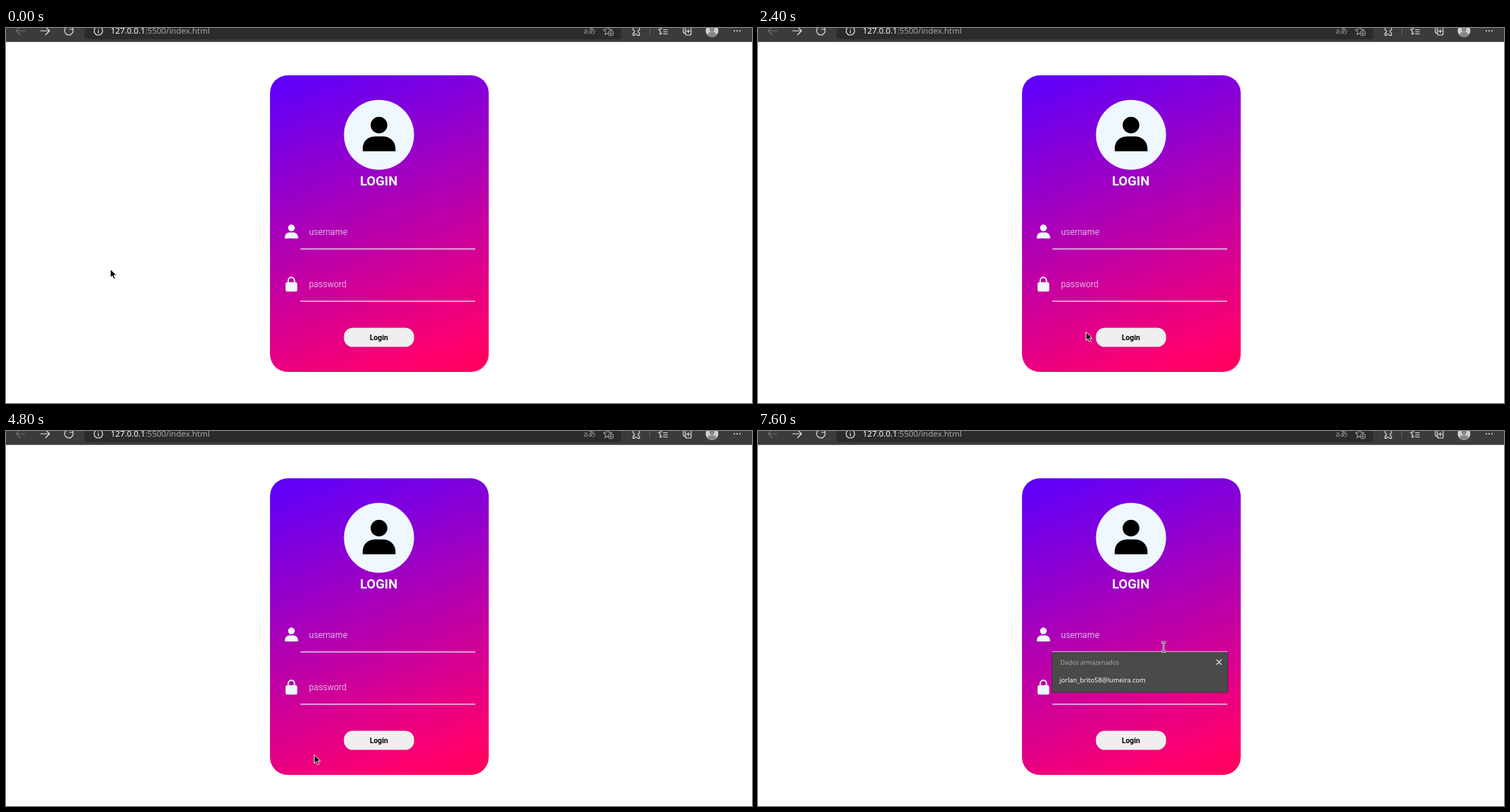
An HTML page that plays this animation: 1054x531 px, repeating every 8000 ms.

```html
<!DOCTYPE html>
<html lang="en">
<head>
<meta charset="utf-8">
<title>Login</title>
<style>
html, body { margin: 0; width: 100%; height: 100%; overflow: hidden; background: #fff; }
body { position: relative; }
svg { position: absolute; left: 0; top: 0; }
.card {
  position: absolute; left: 372.5px; top: 66.5px; width: 309px; height: 420px; border-radius: 25px;
  background: linear-gradient(160deg, #5a00ff, #ff006e 90%, #ff0059);
}
text { font-family: Roboto, sans-serif; }
.title { font-size: 18.4px; font-weight: 700; fill: #f0f8ff; text-anchor: middle; }
.hint { font-size: 12.35px; font-weight: 300; fill: #f0f8ff; }
.go { font-size: 10.3px; font-weight: 700; text-anchor: middle; }
.url { font: 11.5px "Noto Sans", sans-serif; fill: #a6a6a6; }
.pop text { font-family: "Noto Sans", sans-serif; }
.line { fill: none; stroke: #e4e4e4; stroke-width: 1.2; stroke-linecap: round; stroke-linejoin: round; }

.button, .cursor, .arrow, .beam, .pop, .caret { animation: 8s step-end infinite; }
.button { animation-name: dodge; }
.cursor { animation-name: travel; }
.arrow { animation-name: arrow; }
.beam { animation-name: beam; }
.pop { animation-name: pop; }
.caret { animation-name: caret; }

/* 1.25% is one tick of 100 ms */
@keyframes dodge {
  0%, 41.25%, 57.5%, 73.75% { transform: none; }
  37.5% { transform: translateX(50px); }
  40% { transform: translateX(7.5px); }
  47.5% { transform: translateX(-4px); }
  50% { transform: translateX(-93px); }
  51.25% { transform: translateX(-99px); }
  55% { transform: translateX(-30px); }
  60% { transform: none; }
  62.5% { transform: translateX(22px); }
  65% { transform: translateX(95px); }
  66.25% { transform: translateX(99px); }
  71.25% { transform: translateX(60px); }
}
@keyframes travel {
  0% { transform: translate(147px, 341px); }
  3.75% { transform: translate(147px, 341px); animation-timing-function: steps(2, start); }
  6.25% { transform: translate(190px, 335px); animation-timing-function: steps(3, start); }
  10% { transform: translate(430px, 292px); animation-timing-function: steps(2, start); }
  12.5% { transform: translate(456px, 290px); }
  15% { transform: translate(456px, 290px); animation-timing-function: steps(3, start); }
  18.75% { transform: translate(441px, 321px); animation-timing-function: steps(5, start); }
  25% { transform: translate(440px, 368px); }
  28.75% { transform: translate(450px, 400px); }
  30% { transform: translate(463px, 430px); }
  37.5% { transform: translate(632px, 518px); }
  40% { transform: translate(661px, 529px); }
  41.25% { transform: translate(661px, 540px); }
  43.75% { transform: translate(661px, 480px); }
  45% { transform: translate(640px, 452px); }
  47.5% { transform: translate(560px, 437px); }
  50% { transform: translate(636px, 444px); }
  51.25% { transform: translate(627px, 436px); }
  55% { transform: translate(470px, 518px); }
  57.5% { transform: translate(428px, 493px); }
  60% { transform: translate(435px, 458px); }
  62.5% { transform: translate(486px, 437px); }
  65% { transform: translate(445px, 441px); }
  66.25% { transform: translate(432px, 437px); }
  68.75% { transform: translate(487px, 512px); }
  71.25% { transform: translate(821px, 397px); }
  73.75% { transform: translate(829px, 396px); }
  76.25% { transform: translate(788px, 387px); }
  78.75% { transform: translate(640px, 325px); }
  80% { transform: translate(575px, 307px); }
  93.75% { transform: translate(574px, 306px); }
  95%, 100% { transform: translate(573px, 306px); }
}
@keyframes arrow {
  0%, 17.5%, 28.75% { opacity: 1; }
  8.75%, 20%, 80%, 100% { opacity: 0; }
}
@keyframes beam {
  0%, 17.5%, 28.75% { opacity: 0; }
  8.75%, 20%, 80%, 100% { opacity: 1; }
}
@keyframes pop {
  0% { opacity: 0; }
  88.75%, 100% { opacity: 1; }
}
@keyframes caret {
  0%, 95%, 100% { opacity: 0; }
  88.75% { opacity: 1; }
}
</style>
</head>
<body>
<div class="card"></div>
<svg width="1054" height="531" viewBox="0 0 1054 531">
  <defs>
    <path id="bust" d="M504 174.5V171C504 160 512 153.5 521 153.5H533C542 153.5 550.3 160 550.3 171V174.5Z M515.2 137.5a11.8 11.8 0 1 1 23.6 0a11.8 11.8 0 1 1-23.6 0"/>
    <path id="star" d="M0-6L1.8-2.1 6-1.6 2.9 1.3 3.7 5.5 0 3.4-3.7 5.5-2.9 1.3-6-1.6-1.8-2.1Z"/>
  </defs>

  <g class="toolbar">
    <rect width="1054" height="19.7" fill="#3b3b3b"/>
    <rect x="111" y="-10" width="758" height="26" rx="4" fill="#2b2b2b"/>
    <path class="line" style="stroke:#707070" d="M27 4H15M20-1.5L14.500 4L20 9.500"/>
    <path class="line" d="M49 4H61M56-1.500L61.500 4L56 9.500"/>
    <path class="line" d="M94.500 2A6 6 0 1 1 91-1.700M94.500-3V2H90"/>
    <circle class="line" cx="130.500" cy="4" r="6"/>
    <path class="line" d="M130.500 3.500V7M130.500 1V1.200"/>
    <text class="url" x="148" y="8"><tspan fill="#fff">127.0.0.1</tspan>:5500/index.html</text>
    <text x="816" y="7.500" style="font:11px 'Noto Sans CJK JP','Noto Sans CJK',sans-serif" fill="#999" textLength="0">aあ</text>
    <g class="line" style="stroke:#999">
      <use href="#star" x="850" y="4"/>
      <circle cx="854.500" cy="7.500" r="3.500" fill="#2b2b2b"/>
      <path d="M852.800 7.500h3.400M854.500 5.800v3.400"/>
    </g>
    <path class="line" d="M886-1H889A2 2 0 0 1 893-1H895V3A2 2 0 0 0 895 7V10.500H892A2 2 0 0 0 888 10.500H886V7A2 2 0 0 0 886 3Z"/>
    <path d="M909.500 0V10" stroke="#666"/>
    <path class="line" d="M929-.500L927-3L925.500 1.500L922 2L924.700 4.700L924 9L927 7.500M929 2.500H934.500M929 5.500H934.500M929 8.500H934.500"/>
    <path class="line" d="M957-2V5Q957 7.500 959.500 7.500M960-1H966Q968 -1 968 1V8Q968 10 966 10H962Q960 10 960 8ZM964 2V7M961.500 4.500H966.500"/>
    <circle cx="997.500" cy="4" r="9" fill="#d2d0ce"/>
    <circle cx="997.500" cy="2" r="3.500" fill="#8a8886"/>
    <path d="M991 10A6.500 4.500 0 0 1 1004 10A9 9 0 0 1 991 10" fill="#8a8886"/>
    <path d="M1029 4h.1M1033 4h.1M1037 4h.1" stroke="#e4e4e4" stroke-width="2" stroke-linecap="round"/>
  </g>

  <circle cx="527" cy="151.200" r="49.500" fill="#f0f8ff"/>
  <use href="#bust"/>
  <text class="title" x="526.700" y="223">LOGIN</text>

  <g fill="#f0f8ff">
    <use href="#bust" transform="translate(403.300 298) scale(.405) translate(-527.100 -174.500)"/>
    <rect x="395" y="360" width="16.500" height="13.300" rx="2.500"/>
    <path d="M398.800 361V357.500a4.400 4.400 0 0 1 8.800 0V361" fill="none" stroke="#f0f8ff" stroke-width="2"/>
    <path d="M416 312.300h247v1.300h-247zM416 386.300h247v1.300h-247z"/>
  </g>
  <text class="hint" x="428" y="292.500">username</text>
  <text class="hint" x="428" y="367">password</text>

  <g class="button">
    <rect x="477.500" y="424.500" width="99" height="27" rx="12.300" fill="#efefef"/>
    <text class="go" x="526.800" y="441.700">Login</text>
  </g>

  <path class="caret" d="M428.500 281V296" stroke="#fff"/>
  <g class="pop">
    <rect x="415.500" y="313.500" width="248" height="56.500" rx="2" fill="#4a4a4a" stroke="#363636"/>
    <text x="427.300" y="330.500" font-size="8.600" fill="#a8a8a8">Dados armazenados</text>
    <text x="426" y="356.300" font-size="9.150" fill="#fff">jorlan_brito58@lumeira.com</text>
    <path class="line" d="M648 324l6.500 6.500M654.500 324l-6.500 6.500"/>
  </g>

  <g class="cursor">
    <path class="arrow" d="M.500.500V12.500L3.200 10L5.300 14.500L7.400 13.500L5.300 9.200H9Z" stroke="#fff" stroke-width=".9"/>
    <g class="beam" fill="none">
      <path d="M-3-6.500H3M0-6.500V6.500M-3 6.500H3" stroke="#fff" stroke-width="2.400"/>
      <path d="M-2.500-6.500H2.500M0-6.500V6.500M-2.500 6.500H2.500" stroke="#222" stroke-width=".9"/>
    </g>
  </g>
</svg>
</body>
</html>
```
